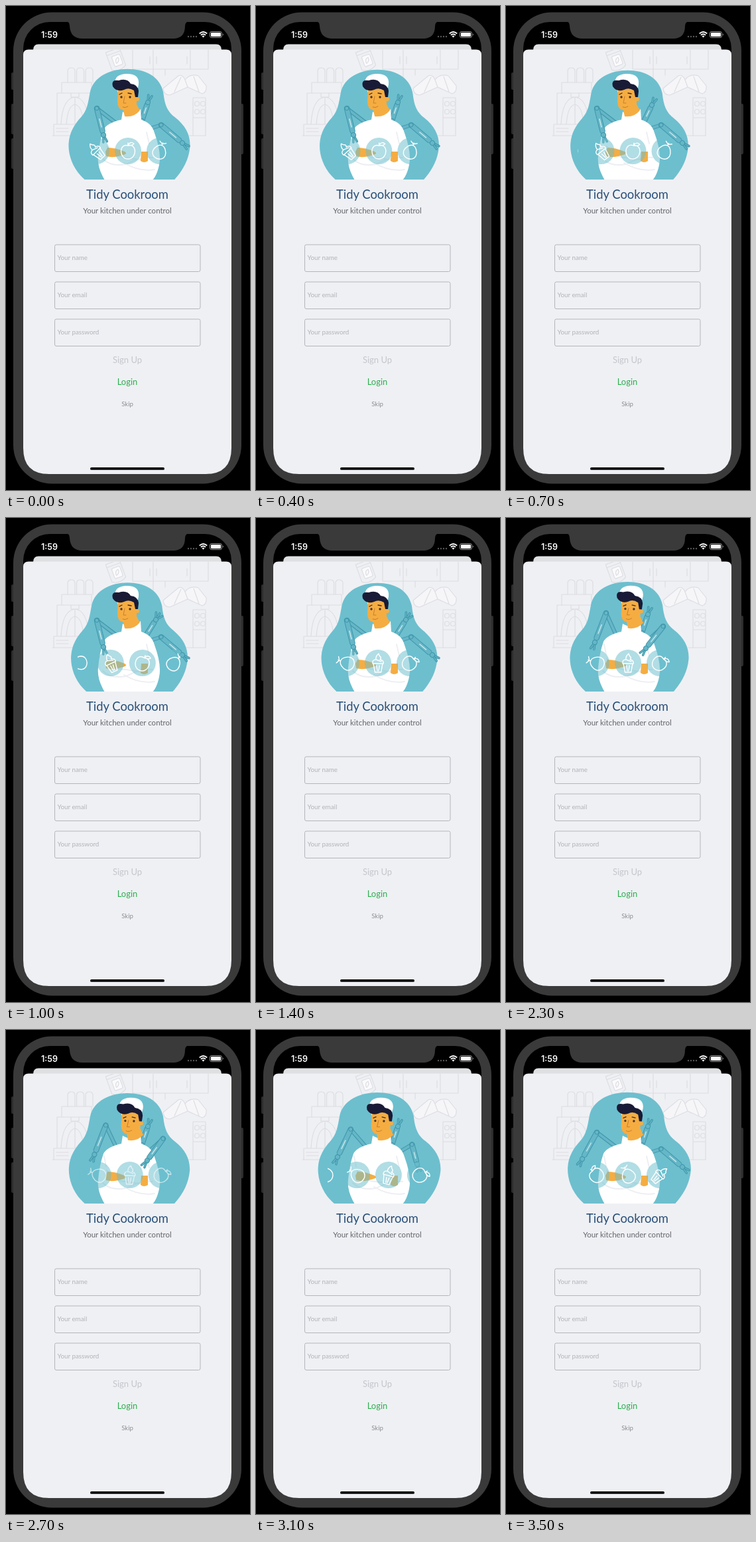
An HTML page that plays this animation: 368 by 728 pixels, repeating every 3.6 s.

```html
<!DOCTYPE html>
<html lang="en">
<head>
<meta charset="utf-8">
<title>Sign up</title>
<style>
  html, body { margin: 0; width: 100%; height: 100%; overflow: hidden; background: #000; }
  svg { display: block; width: 368px; height: 728px; }
  text { font-family: Lato, "Open Sans", sans-serif; }
  .mid { text-anchor: middle; }
  .line { fill: none; stroke-linecap: round; stroke-linejoin: round; }
</style>
</head>
<body>
<svg viewBox="0 0 368 728">
  <defs>
    <clipPath id="art"><rect x="27" y="66" width="313" height="195"/></clipPath>
    <clipPath id="belt"><rect x="108" y="190" width="155" height="60"/></clipPath>
  </defs>

  <g fill="#2d2d2d">
    <rect x="8" y="100" width="6" height="26" rx="2"/>
    <rect x="8" y="147" width="6" height="46" rx="2"/>
    <rect x="8" y="199" width="6" height="46" rx="2"/>
    <rect x="352" y="147" width="6" height="76" rx="2"/>
  </g>
  <rect x="11" y="9.5" width="344" height="709" rx="58" fill="#3a3a3a"/>
  <rect x="26" y="24" width="314" height="680" rx="40"/>
  <path d="M91 23Q96 24 96 30Q97 49 115 49H252Q270 49 270 30Q270 24 276 23Z" fill="#3a3a3a"/>
  <path d="M41 80V66Q41 57.500 49 57.500H317Q325 57.500 325 66V80Z" fill="#dfe0e2"/>
  <path d="M26 73Q26 65.500 34 65.500H332Q340 65.500 340 73V665Q340 704 301 704H65Q26 704 26 665Z" fill="#eff0f4"/>

  <text x="53" y="47.5" fill="#fff" font-size="12.500" font-weight="600" style="font-family:Inter,sans-serif">1:59</text>
  <path class="line" d="M275 46H288" stroke="#555" stroke-width="2.400" stroke-dasharray="0 4"/>
  <path d="M291.800 41.500Q297.500 36.500 303.200 41.500M293.900 43.800Q297.500 40.700 301.100 43.800" fill="none" stroke="#fff" stroke-width="1.800"/>
  <path d="M295.500 45.400Q297.500 43.800 299.500 45.400L297.500 47.600Z" fill="#fff"/>
  <rect x="307.500" y="38.500" width="18" height="9" rx="2.600" fill="none" stroke="#999"/>
  <rect x="309" y="40" width="15" height="6" rx="1.300" fill="#fff"/>
  <path d="M327 41.500Q329 43 327 44.500Z" fill="#999"/>

  <g clip-path="url(#art)">
    <g class="line" stroke="#dddee2" stroke-width="1.200">
      <path d="M70 195H301M72 195V178H130V195M77 178V131H130M84 131V115H129V131M83 178Q85 139 104 137Q123 139 125 178M91 178Q93 150 104 148Q115 150 117 178M104 137V178M98 131V137H110V131M76 184H94M76 189H94"/>
      <g id="bottles"></g>
      <path d="M191 66V95H305V66M222 66V109M278 66V95M217 76V87M227 76V87M273 76V87M240 95V104M282 138V195M282 168H301M301 138V195M282 138H301"/>
      <g id="knobs"></g>
      <g transform="rotate(-20 167 81)">
        <path d="M155 65H177V93Q166 100 155 93ZM155 70H177"/>
        <rect x="161" y="74" width="13" height="16" rx="2" fill="#fafafc"/>
        <path d="M165 86Q164 79 170 78Q171 84 165 86"/>
      </g>
      <path d="M237 124L260 105Q266 102 270 111Q278 101 290 105L302 120Q303 130 296 132L274 122L247 134Q238 134 237 124Z" fill="#f6f6f9"/>
      <path d="M270 111L274 122M264 107L254 129M283 106L291 129"/>
    </g>
    <path id="blob" fill="#6dbfce" d="M120 262C101 246 94 224 95 207C96 190 104 178 113 168C123 157 124 146 127 130C132 106 158 95 183 95C210 95 232 106 237 130C239 149 243 159 255 168C270 180 278 194 277 212C275 234 264 250 253 262Z"/>
    <g id="backArms" class="line"></g>
    <path fill="#fff" d="M176 159Q190 168 203 155L204 171Q220 176 224 191Q235 221 231 239Q228 254 221 262H149Q137 242 139 225Q141 203 147 186Q152 176 174 171Z"/>
    <g id="head">
      <path d="M166 121Q160 104 180 102Q202 101 200 118L197 131H169Z" fill="#fff"/>
      <path d="M169 121L168 144Q168 155 177 157L179 166Q193 168 202 157L197 148V121Z" fill="#f5ad42"/>
      <circle cx="198" cy="140" r="3" fill="#f5ad42"/>
      <path d="M161 121Q158 110 170 112Q183 108 188 117Q199 118 200 128L199 137H195L193 127Q185 122 178 126Q167 130 161 121Z" fill="#191b36"/>
      <path class="line" stroke="#c97e2b" d="M179 136L177 146H181M176 152Q180 154 184 151"/>
      <g id="eyes" class="line" stroke="#3a2c2a" stroke-width="1.300">
        <path d="M171 133L175 131M184 131L189 132"/>
        <ellipse cx="174" cy="137" rx="1"/><ellipse cx="187" cy="137" rx="1"/>
      </g>
    </g>
    <g class="line" stroke="#eceef2" stroke-width="1.800">
      <path d="M152 211Q163 228 181 228L207 232M146 230Q158 242 181 238Q205 226 221 228M178 236Q202 250 224 246M151 205L148 190M216 207L212 190"/>
    </g>
    <path fill="#f5ad42" d="M150 219L153 213Q165 213 179 219Q184 222 177 224Q162 229 151 226ZM204 219H214V233Q208 237 203 233Z"/>
    <g id="frontArms" class="line"></g>
    <g id="foods" class="line" clip-path="url(#belt)"></g>
  </g>

  <text class="mid" x="183" y="289.500" font-size="18.400" fill="#285079">Tidy Cookroom</text>
  <text class="mid" x="183" y="312" font-size="11.500" fill="#62656c">Your kitchen under control</text>
  <g id="form"></g>
  <text class="mid" x="183" y="537" font-size="13" fill="#c4c6cc">Sign Up</text>
  <text class="mid" x="183" y="570" font-size="13" fill="#2cae4f">Login</text>
  <text class="mid" x="183" y="602" font-size="9.600" fill="#8b8d93">Skip</text>
  <rect x="127" y="694" width="112" height="3.800" rx="1.900"/>
</svg>
<script>
const LOOP = 3600, STEP = 100, SLOT = 48;
const TEAL = '#65b6c7', EDGE = '#3f96a9';
const $ = id => document.getElementById(id);
const clamp = p => Math.max(0, Math.min(1, p));
const mix = (a, b, p) => a + (b - a) * p;
const ease = (t, from, to) => {
  const p = clamp((t - from) / (to - from));
  return p * p * (3 - 2 * p);
};
const bump = (t, middle, reach) => Math.max(0, 1 - ((t - middle) / reach) ** 2);
const slide = (t, start) => clamp((t - start) / 1300) ** 3;

$('form').innerHTML = ['Your name', 'Your email', 'Your password'].map((label, i) => {
  const y = 359 + i * 56;
  return `<rect x="73.5" y="${y}" width="219.500" height="40.500" rx="2.500" fill="none" stroke="#b4b6bb"/>
    <text x="77.500" y="${y + 23}" font-size="9.800" fill="#b1b3b9">${label}</text>`;
}).join('');
$('bottles').innerHTML = [0, 1, 2].map(i =>
  `<path d="M${93 + i * 13.5} 115v-17q0-5 5.500-5t5.500 5v17"/>`).join('');
$('knobs').innerHTML = [0, 1, 2, 3].map(i =>
  `<circle cx="${288 + i % 2 * 9}" cy="${147 + (i >> 1) * 12}" r="3.500"/>`).join('');

const cone = { turn: 0, d: 'M-7 1H7L4.500 14H-4.500ZM-2 4L-1 12M2 4L1 12M-8 1Q-9-5-3-5Q-4-10 1-14Q2-10 4-9Q5-6 3-5Q9-4 8 1M-3-5L5-2' };
const orange = { turn: 0, d: 'M0-8C-14-12-14 12 0 12C14 12 14-12 0-8V-12M0-9Q4-15 9-11Q6-7 0-9' };
const pear = { turn: -25, d: 'M0-9C-5-9-10-2-10 4C-9 15 9 15 10 4C10-2 5-9 0-9V-13M-5-14L0-11L5-14' };
const foods = [cone, orange, pear];

function limb(a, b, width) {
  const d = `M${a}L${b}`;
  return `<path d="${d}" stroke="${EDGE}" stroke-width="${width + 2}"/>
    <path d="${d}" stroke="${TEAL}" stroke-width="${width}"/>`;
}

function forearm(elbow, hand, fingers) {
  const [dx, dy] = [hand[0] - elbow[0], hand[1] - elbow[1]];
  const along = p => [elbow[0] + dx * p, elbow[1] + dy * p];
  const angle = Math.atan2(dy, dx) * 180 / Math.PI;
  const spread = Array.from({ length: fingers }, (_, i) =>
    `<g transform="rotate(${(i - (fingers - 1) / 2) * 30})">${limb([2, 0], [11, 0], 1.5)}</g>`).join('');
  return limb(elbow, along(.85), 6.5) +
    `<circle cx="${elbow[0]}" cy="${elbow[1]}" r="3" fill="${TEAL}" stroke="${EDGE}"/>
    <path d="M${along(.4)}L${along(.7)}" stroke="#c5e6ec" stroke-width="1.500"/>
    <g transform="translate(${hand}) rotate(${angle})">${spread}
    <circle r="3.500" fill="${TEAL}" stroke="${EDGE}"/></g>`;
}

function food({ turn, d }, slot, fade) {
  return `<g transform="translate(${184 + slot * SLOT} 218)">
    <circle r="20" fill="#6dbfce" opacity=".53"/>
    <path d="${d}" transform="rotate(${slot * 45 + turn})" stroke="#fff" stroke-width="1.400" opacity="${fade}"/></g>`;
}

function drawArms(t) {
  const raise = ease(t, 1400, 1900), lower = ease(t, 2600, 3500), lift = raise - lower;
  const wave = ease(t, 400, 1000) - ease(t, 1400, 1900);
  const leftElbow = [137 + 14 * lift, 154 - 11 * lift];
  const leftHand = [147 - 13 * raise - 19 * lower, 194 - 7 * lift];
  const rightElbow = [234 + 3 * lift, 179 - 16 * lift];
  const rightHand = [mix(266, 211, lift), mix(206, 196, lift)];
  const raisedElbow = [205 + 3 * wave, 172 + 10 * wave];
  const raisedHand = [214 + 12 * wave, 145 + 8 * wave];
  $('backArms').innerHTML = limb([166, 176], leftElbow, 4) + limb([212, 186], rightElbow, 4) +
    forearm(raisedElbow, raisedHand, wave > .5 ? 3 : 2);
  $('frontArms').innerHTML = forearm(leftElbow, leftHand, 2) + forearm(rightElbow, rightHand, 2);
}

function draw(t) {
  const scale = .99 + .03 * Math.cos(2 * Math.PI * (t - 3500) / 4200);
  const lean = ease(t, 1400, 1900);
  const fade = 1 - .4 * bump(t, 2700, 400);
  const shift = slide(t, 0) + slide(t, 2200);
  $('blob').setAttribute('transform', `translate(186 262) scale(${scale} ${mix(1, scale, .4)}) translate(-186 -262)`);
  $('head').setAttribute('transform', `translate(${5 * lean}) rotate(${2 * lean} 188 162)`);
  for (const eye of $('eyes').querySelectorAll('ellipse')) eye.setAttribute('ry', 1 - .9 * bump(t, 1900, 150));
  drawArms(t);
  $('foods').innerHTML = foods.map((item, i) => {
    const slot = (i + shift) % 3 - 1;
    return food(item, slot, fade) + food(item, slot - 3, fade);
  }).join('');
}

function tick() {
  draw(Math.floor(performance.now() % LOOP / STEP) * STEP);
  requestAnimationFrame(tick);
}
tick();
</script>
</body>
</html>
```
